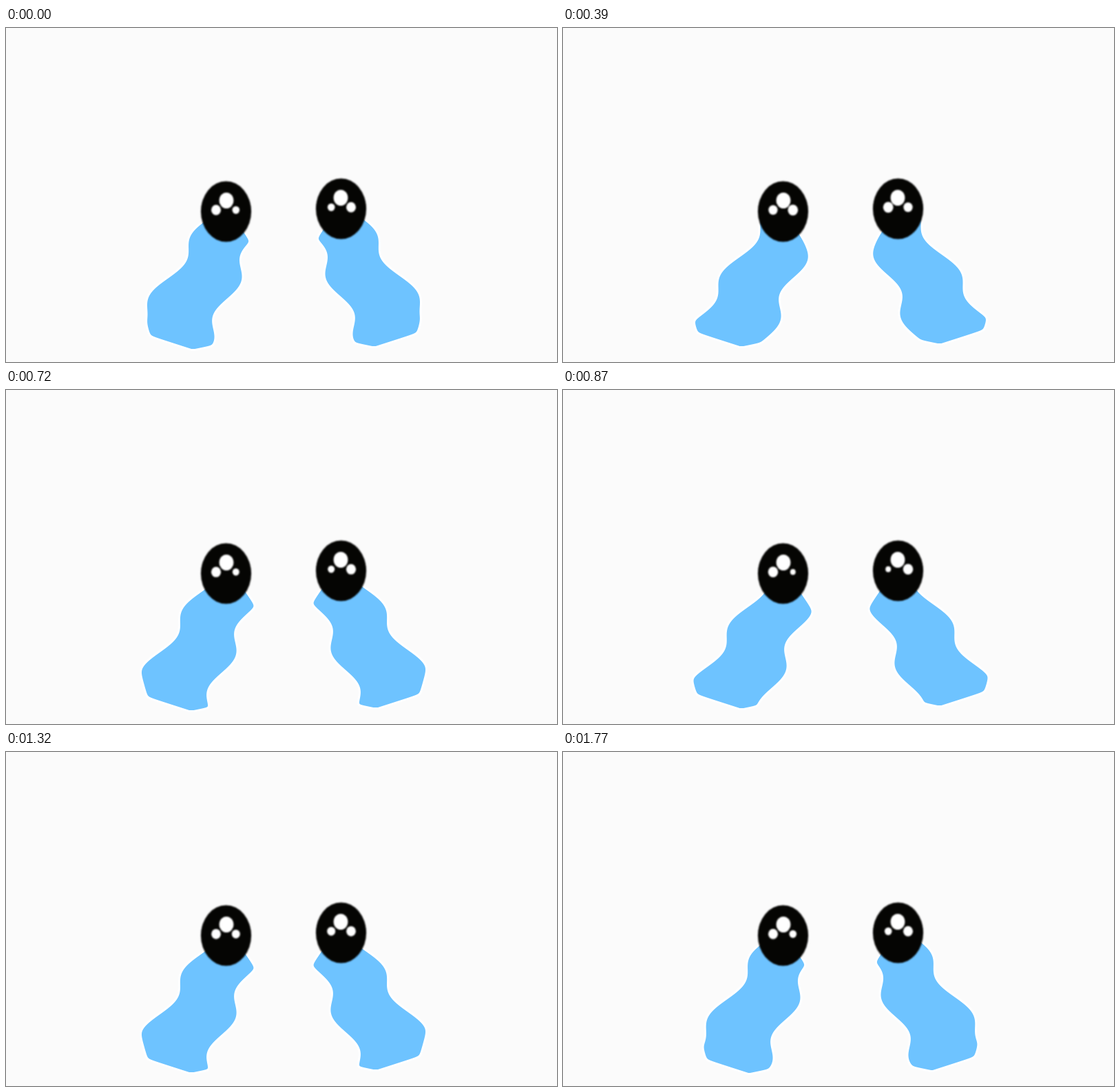
An HTML page that plays this animation: 800 by 485 pixels, repeating every 1.8 s.

```html
<!DOCTYPE html>
<html lang="en">
<head>
<meta charset="utf-8">
<title>Crying eyes</title>
<style>
  html, body { margin: 0; width: 100%; height: 100%; overflow: hidden; background: #fbfbfb; }
  svg { display: block; width: 800px; height: 485px; }
  #tear { fill: #6ec3ff; stroke: #fff; stroke-width: 6; stroke-linejoin: round; paint-order: stroke; }
</style>
</head>
<body>
<svg viewBox="0 0 800 485">
  <defs>
    <filter id="soft" x="-10%" y="-10%" width="120%" height="120%" color-interpolation-filters="sRGB">
      <feGaussianBlur stdDeviation="0.9"/>
    </filter>
  </defs>
  <g id="half">
    <path id="tear"/>
    <g filter="url(#soft)">
      <ellipse cx="319.5" cy="266.5" rx="36.6" ry="44" fill="#050503"/>
      <g fill="#fff">
        <ellipse cx="320" cy="250.5" rx="10.4" ry="11.6"/>
        <ellipse id="side" cx="305" cy="264.3"/>
        <ellipse id="small" cx="333.8" cy="264.3"/>
      </g>
    </g>
  </g>
  <use href="#half" transform="translate(806 -4) scale(-1 1)"/>
</svg>
<script>
const LOOP = 1800, WAVE = 600, STEP = 30, TURN = 2 * Math.PI;
const WAVELENGTH = 88, TOP = 275, FLOOR = 475;
const FLOOR_SLOPE = 0.32, LIP_SLOPE = 0.2, ROUNDING = 6;

// The larger or smaller of two limits, with a rounded corner where they cross.
const softMax = (a, b) => (a + b + Math.hypot(a - b, ROUNDING)) / 2;
const softMin = (a, b) => -softMax(-a, -b);

// A slanted edge with a sine wave running down it.
function ripple(y, phase, x0, y0, drift, size) {
  const u = (y - y0) / WAVELENGTH;
  return x0 - drift * u + size * Math.sin(TURN * (u - phase));
}

function tearPath(phase) {
  const sway = (mid, size, lag) => mid + size * Math.cos(TURN * (phase - lag));
  const foot = sway(199.5, 7.5, 0.03);
  const brow = sway(345, 5, 0.25);
  const tipX = sway(264.5, 7, 0.05);
  const tipY = 442 + FLOOR_SLOPE * (tipX - 194);

  const outer = [], inner = [];
  for (let y = TOP; y < FLOOR; y++) {
    const wet = softMax(ripple(y, phase, 265, 320, 61, 10), foot + 0.3 * (y - 440));
    const left = softMax(wet, tipX + (y - tipY) / FLOOR_SLOPE);
    const dry = softMin(ripple(y, phase, 321, 393, 40, -9.5), brow + 0.7 * (y - 296));
    const right = softMin(dry, tipX + (tipY - y) / LIP_SLOPE);
    if (left >= right) break;
    outer.push(left.toFixed(2) + " " + y);
    inner.push(right.toFixed(2) + " " + y);
  }
  return "M" + outer.concat(inner.reverse()).join("L") + "Z";
}

// A swing that quickens and dies away over the loop.
function glint(t) {
  return 2.7 * (1 - t / LOOP) * Math.sin(TURN * (t / 1110) ** 1.45);
}

const part = id => document.getElementById(id);
const tear = part("tear"), side = part("side"), small = part("small");

function resize(dot, r) {
  dot.setAttribute("rx", r);
  dot.setAttribute("ry", r * 1.07);
}

function draw(t) {
  const swing = glint(t);
  tear.setAttribute("d", tearPath(t % WAVE / WAVE));
  resize(small, 5.3 + swing);
  resize(side, 7 - 0.2 * swing);
}

const begin = performance.now();
function tick() {
  const t = (performance.now() - begin) % LOOP;
  draw(Math.floor(t / STEP) * STEP);
  requestAnimationFrame(tick);
}
tick();
</script>
</body>
</html>
```
